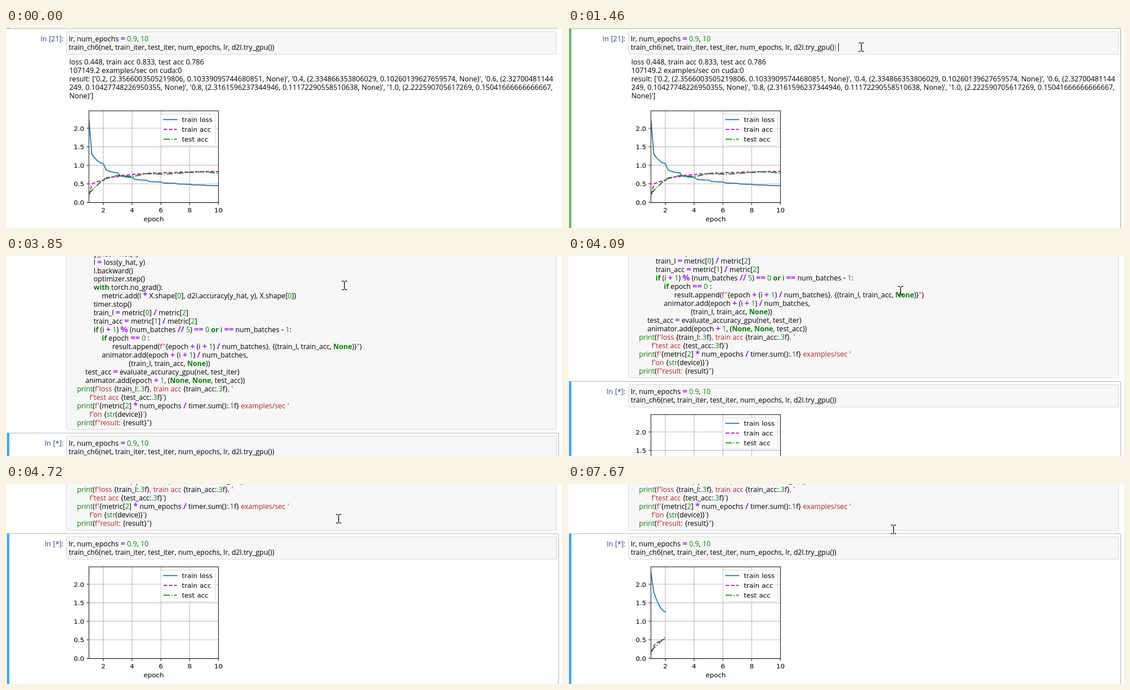
Write an HTML page with a canvas that moves like this. It is 1247 by 449 pixels and loops after 8 s.

```html
<!DOCTYPE html>
<html lang="en">
<head>
<meta charset="utf-8">
<title>Notebook training run</title>
<style>
html, body { margin: 0; width: 100%; height: 100%; overflow: hidden; background: #fff }
canvas { display: block }
</style>
</head>
<body>
<canvas id="stage" width="1247" height="449"></canvas>
<script>
const ctx = document.getElementById('stage').getContext('2d');
const LOOP = 8000, CLICK = 1460, RUN = 2880;
const SANS = '"Open Sans", "Noto Sans", sans-serif';
const PLOT_FONT = '14.9px "DejaVu Sans", sans-serif';
const CODE = '15.75px ' + SANS;
const LEADING = 18.95, INDENT = 4.65;

const STYLES = {
  plain: ['#000', CODE],
  keyword: ['#008000', 'bold ' + CODE],
  operator: ['#aa22ff', 'bold 18.5px ' + SANS],
  number: ['#008800', CODE],
  string: ['#ba2121', CODE],
  builtin: ['#008000', CODE],
  bracket: ['#00bb00', CODE]
};

const BODY = `
            y_hat = net(X)
            l = loss(y_hat, y)
            l.backward()
            optimizer.step()
            with torch.no_grad():
                metric.add(l * X.shape[0], d2l.accuracy(y_hat, y), X.shape[0])
            timer.stop()
            train_l = metric[0] / metric[2]
            train_acc = metric[1] / metric[2]
            if (i + 1) % (num_batches // 5) == 0 or i == num_batches - 1:
                if epoch == 0 :
                     result.append(f"{epoch + (i + 1) / num_batches}, {(train_l, train_acc, None)}")
                animator.add(epoch + (i + 1) / num_batches,
                             (train_l, train_acc, None))
        test_acc = evaluate_accuracy_gpu(net, test_iter)
        animator.add(epoch + 1, (None, None, test_acc))
    print(f'loss {train_l:.3f}, train acc {train_acc:.3f}, '
          f'test acc {test_acc:.3f}')
    print(f'{metric[2] * num_epochs / timer.sum():.1f} examples/sec '
          f'on {str(device)}')
    print(f"result: {result}")`.slice(1).split('\n').map(highlight);
const CALL = [
  'lr, num_epochs = 0.9, 10',
  'train_ch6(net, train_iter, test_iter, num_epochs, lr, d2l.try_gpu())'
].map(highlight);
const RESULT = [
  'loss 0.448, train acc 0.833, test acc 0.786',
  '107149.2 examples/sec on cuda:0',
  "result: ['0.2, (2.3566003505219806, 0.10339095744680851, None)', '0.4, (2.334866353806029, 0.10260139627659574, None)', '0.6, (2.32700481144",
  "249, 0.10427748226950355, None)', '0.8, (2.3161596237344946, 0.11172290558510638, None)', '1.0, (2.222590705617269, 0.15041666666666667,",
  "None)']"
];

// Training curves: each epoch restarts its running mean, which settles on floor + slope / epoch
const DONE = {
  loss: { start: 2.222, floor: .3, slope: 1.49, jump: .255 },
  acc: { start: .15, floor: .895, slope: -.62, jump: -.095 },
  test: [.24, .625, .725, .69, .775, .76, .775, .808, .822, .786]
};
const LIVE = {
  loss: { start: 2.305, floor: .3, slope: 1.9, jump: .535 },
  acc: { start: .11, floor: .895, slope: -.76, jump: -.175 },
  test: [.2, .57]
};
const UPDATES = [4720, 5720, 5890, 6550, 6730, 7160];
const TEST_SHOWN = 7670;

const SERIES = [
  { key: 'loss', label: 'train loss', color: '#1f77b4', dash: [] },
  { key: 'acc', label: 'train acc', color: '#bf00bf', dash: [8.26, 3.57] },
  { key: 'test', label: 'test acc', color: '#008000', dash: [14.3, 3.57, 2.23, 3.57] }
];

// Pointer moves, each a curve from the last resting place
const ENTRY = [726, 470];
const MOVES = [
  { from: 100, to: 900, steps: 12, bend: [606, 150], end: [671, 47] },
  { from: 970, to: 1140, steps: 4, bend: [664, 45], end: [658, 43] },
  { from: 3510, to: 3850, steps: 4, bend: [500, 36], end: [759, 66] },
  { from: 4000, to: 4090, steps: 2, bend: [752, 74], end: [746, 78] },
  { from: 5890, to: 5990, steps: 2, bend: [740, 90], end: [730, 102] }
];

function tokens(src) {
  return src.match(/[a-z_]\w*|\.?\d[\d.]*|[=+*\/%-]+|\s+|./gi).map(str => ({
    str,
    style: /^(with|if|or|None)$/.test(str) ? 'keyword'
      : /^(print|str)$/.test(str) ? 'builtin'
      : /^\.?\d/.test(str) ? 'number'
      : /^[=+*\/%-]/.test(str) ? 'operator' : 'plain'
  }));
}

function highlight(src) {
  const code = src.trimStart();
  const parts = code.split(/(f'.*'|f".*")/).filter(Boolean).flatMap(part =>
    /^f['"]/.test(part)
      ? part.split(/(\{.*?\})/).filter(Boolean).flatMap(s =>
          s[0] === '{' ? tokens(s) : { str: s, style: 'string' })
      : tokens(part));
  return { indent: src.length - code.length, parts };
}

function text(str, x, y, color, font, align = 'left') {
  ctx.fillStyle = color;
  ctx.font = font;
  ctx.textAlign = align;
  ctx.fillText(str, x, y);
  return x + ctx.measureText(str).width;
}

function codeLine({ indent, parts }, y, matched) {
  const open = parts.findIndex(p => p.str === '(');
  let x = 140.7 + indent * INDENT;
  parts.forEach(({ str, style }, i) => {
    if (matched && (i === open || i === parts.length - 1)) style = 'bracket';
    x = text(str, x, y, ...STYLES[style]);
  });
}

function line(x1, y1, x2, y2) {
  ctx.beginPath();
  ctx.moveTo(x1, y1);
  ctx.lineTo(x2, y2);
  ctx.stroke();
}

function box(x, y, w, h, r, fill, stroke) {
  ctx.beginPath();
  ctx.roundRect(x, y, w, h, r);
  ctx.fillStyle = fill;
  ctx.fill();
  ctx.strokeStyle = stroke;
  ctx.lineWidth = 1;
  ctx.stroke();
}

function inputCell(top, label, matched) {
  box(135.5, top + 6.5, 1099, 50.5, 2, '#f7f7f7', '#cfcfcf');
  text(label, 129, top + 27.5, '#303f9f', '15.9px ' + SANS, 'right');
  CALL.forEach((src, i) => codeLine(src, top + 27.7 + i * LEADING, matched && i === 1));
}

function cellFrame(top, bar, edge) {
  ctx.strokeStyle = edge;
  ctx.lineWidth = 1.2;
  ctx.beginPath();
  ctx.moveTo(2, top - .5);
  ctx.lineTo(1237.5, top - .5);
  ctx.quadraticCurveTo(1239.5, top - .5, 1239.5, top + 1.5);
  ctx.lineTo(1239.5, 460);
  ctx.stroke();
  ctx.fillStyle = bar;
  ctx.fillRect(2, top - 1, 5.5, 460);
}

function runningMean({ start, floor, slope, jump }, x) {
  if (x <= 1) return start;
  const epoch = Math.ceil(x) - 1, left = (epoch + 1 - x) / .8;
  return floor + slope / (epoch + 1) + jump / epoch ** 1.8 * left ** 1.8;
}

// Points [x, value] of one curve up to the given epoch
function points(curve, limit) {
  if (Array.isArray(curve)) return curve.map((v, i) => [i + 1, v]);
  const pts = [];
  for (let n = 4; n <= Math.round(limit * 5); n++) pts.push([n / 5, runningMean(curve, n / 5)]);
  return pts;
}

function chart(top, run, limit) {
  const px = v => 186 + (v - 1) * 32.28, py = v => 205.3 - v * 83.15;
  const pen = ({ color, dash }) => {
    ctx.strokeStyle = color;
    ctx.lineWidth = 2.23;
    ctx.setLineDash(dash);
    ctx.lineCap = dash.length ? 'butt' : 'square';
  };
  ctx.save();
  ctx.translate(0, top);
  ctx.lineWidth = 1.19;
  for (let v = 2; v <= 10; v += 2) {
    ctx.strokeStyle = '#b0b0b0';
    line(px(v), 0, px(v), 206);
    ctx.strokeStyle = '#000';
    line(px(v), 206, px(v), 211.2);
    text(v, px(v), 228, '#000', PLOT_FONT, 'center');
  }
  for (let v = 0; v <= 2; v += .5) {
    ctx.strokeStyle = '#b0b0b0';
    line(186, py(v), 476.5, py(v));
    ctx.strokeStyle = '#000';
    line(180.8, py(v), 186, py(v));
    text(v.toFixed(1), 175.5, py(v) + 5.5, '#000', PLOT_FONT, 'right');
  }
  text('epoch', 331.3, 247.5, '#000', PLOT_FONT, 'center');

  ctx.save();
  ctx.beginPath();
  ctx.rect(186, 0, 290.5, 206);
  ctx.clip();
  ctx.lineJoin = 'round';
  for (const s of SERIES.filter(s => run[s.key])) {
    pen(s);
    ctx.beginPath();
    points(run[s.key], limit).forEach(([x, v]) => ctx.lineTo(px(x), py(v)));
    ctx.stroke();
  }
  ctx.restore();

  ctx.strokeStyle = '#000';
  ctx.lineWidth = 1.19;
  ctx.strokeRect(186, 0, 290.5, 206);
  box(347.5, 7.5, 122, 70, 3, 'rgba(255,255,255,.8)', 'rgba(204,204,204,.9)');
  SERIES.forEach((s, i) => {
    const y = 19.7 + i * 21.9;
    ctx.save();
    pen(s);
    line(353.5, y, 383, y);
    ctx.restore();
    text(s.label, 394.5, y + 5, '#000', PLOT_FONT);
  });
  ctx.restore();
}

function beam(x, y) {
  ctx.strokeStyle = '#000';
  ctx.lineWidth = 1.6;
  line(x, y - 8.5, x, y + 8.5);
  for (const dy of [-9.5, 9.5]) {
    line(x - 6, y + dy, x - 1, y + dy);
    line(x + 1, y + dy, x + 6, y + dy);
  }
}

function arrow(x, y) {
  ctx.beginPath();
  for (const [dx, dy] of [[0, 0], [0, 16], [4, 12.5], [6.5, 18.5], [9, 17.5], [6.5, 11.5], [11.5, 11.5]])
    ctx.lineTo(x + dx, y + dy);
  ctx.closePath();
  ctx.fillStyle = '#fff';
  ctx.fill();
  ctx.strokeStyle = '#000';
  ctx.lineWidth = 1;
  ctx.stroke();
}

function pointer(t) {
  let pos = ENTRY;
  for (const { from, to, steps, bend, end } of MOVES) {
    if (t < from) break;
    const step = 1 + Math.floor((t - from) / (to - from) * (steps - 1));
    const p = Math.min(1, step / steps), q = 1 - p;
    pos = pos.map((a, i) => q * q * a + 2 * p * q * bend[i] + p * p * end[i]);
  }
  const [x, y] = pos;
  (y > 165 ? arrow : beam)(x, y);
}

function finished(t) {
  const active = t >= CLICK;
  if (active) cellFrame(2, '#66bb6a', '#66bb6a');
  else {
    ctx.strokeStyle = '#ababab';
    ctx.lineWidth = 1;
    line(7, 1.5, 1239, 1.5);
    ctx.fillStyle = '#42a5f5';
    ctx.fillRect(2, 0, 5.5, 2);
  }
  inputCell(2, 'In [21]:', active);
  ctx.wordSpacing = '0.4px';
  RESULT.forEach((str, i) => text(str, 142, 81.5 + i * 19, '#000', '16px ' + SANS));
  chart(186, DONE, 10);
  if (active && (t < 1930 || t >= 2520)) {
    ctx.fillStyle = '#000';
    ctx.fillRect(606, 34, 1.2, 19);
  }
}

// Page scroll: smooth in and out, seen in 90 ms steps
function cellTop(t) {
  const seen = 4000 + Math.floor((t - 4000) / 90) * 90;
  const u = t < 4000 ? 0 : Math.min(1, (seen - 3902) / 430);
  return Math.round(398 - 286 * u * u * (3 - 2 * u));
}

function running(t) {
  const top = cellTop(t);
  const updates = UPDATES.filter(u => u <= t).length;
  box(135.5, -20, 1099, top + 11.5, 2, '#f7f7f7', '#cfcfcf');
  BODY.forEach((src, i) => codeLine(src, top - 397.4 + i * LEADING));
  cellFrame(top, '#42a5f5', '#ababab');
  inputCell(top, 'In [*]:', false);
  chart(top + 74, t < TEST_SHOWN ? { ...LIVE, test: null } : LIVE, updates && .8 + updates * .2);
}

function draw(t) {
  ctx.fillStyle = '#fff';
  ctx.fillRect(0, 0, 1247, 449);
  ctx.wordSpacing = '0.55px';
  (t < RUN ? finished : running)(t);
  pointer(t);
}

let start;
function tick(now) {
  start ??= now;
  draw((now - start) % LOOP);
  requestAnimationFrame(tick);
}
requestAnimationFrame(tick);
</script>
</body>
</html>
```
